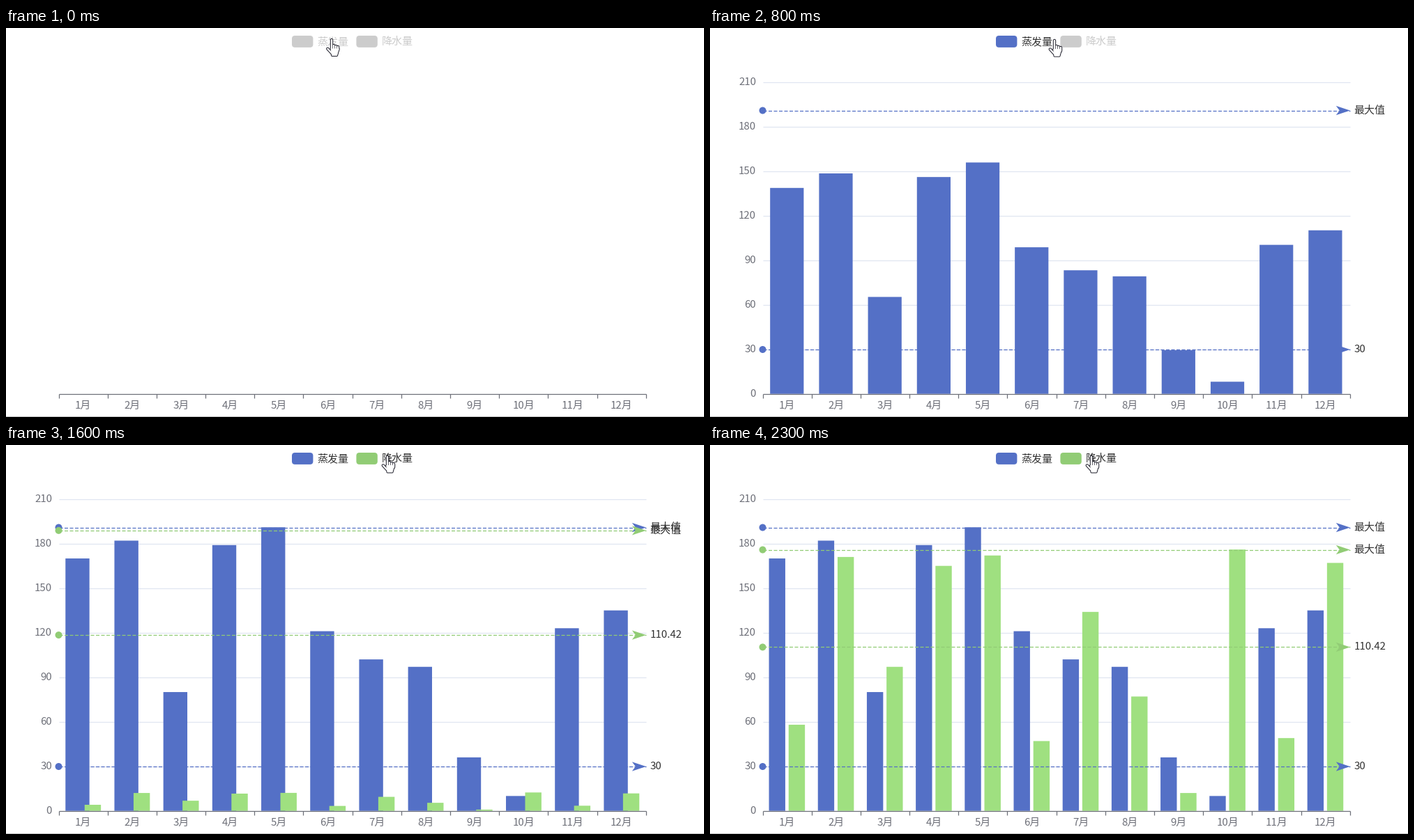
Animation of 1001x559 px, one loop 2.59 s. Source, as a matplotlib script:

```python
import numpy as np
import matplotlib.pyplot as plt
from matplotlib.animation import FuncAnimation
from matplotlib.collections import LineCollection
from matplotlib.patches import Circle, FancyBboxPatch, Polygon, Rectangle
from matplotlib.transforms import Affine2D

W, H, DPI = 1001, 559, 100
PX = 72 / DPI                      # points per pixel
LEFT, RIGHT, BASE, UNIT = 75.5, 917.8, 525.7, 64 / 30
BAND = (RIGHT - LEFT) / 12
WIDE, NARROW, GAP = 48.2, 23.4, 4.7

BLUE, BLUE_LIT = "#5470c6", "#5c7bd9"
GREEN, GREEN_LIT = "#91cc75", "#9fe080"
AXIS, GRID, OFF, INK = "#6e7079", "#e0e6f1", "#cccccc", "#333333"

EVAPORATION = [170, 182, 80, 179, 191, 121, 102, 97, 36, 10, 123, 135]
RAIN = [58, 171, 97, 165, 172, 47, 134, 77, 12, 176, 49, 167]

INTERVAL, FRAMES = 35, 74
STEP, LAST = 100, 23
FIRST_CLICK, SECOND_CLICK = 1, 13

plt.rcParams["font.family"] = ["Noto Sans CJK JP", "DejaVu Sans"]
fig = plt.figure(figsize=(W / DPI, H / DPI), dpi=DPI, facecolor="white")
ax = fig.add_axes([0, 0, 1, 1])
ax.set_xlim(0, W)
ax.set_ylim(H, 0)
ax.axis("off")


def y_of(value):
    return BASE - value * UNIT


def ease(p):
    """Cubic ease in and out."""
    p = min(max(p, 0), 1)
    return 4 * p ** 3 if p < 0.5 else 1 - 4 * (1 - p) ** 3


def mix(a, b, p):
    return a + (b - a) * p


def label(x, y, text, color, ha="left", z=6):
    return ax.text(x, y, text, color=color, ha=ha, va="baseline",
                   fontsize=15 * PX, zorder=z)


def segments(lines, color, z):
    item = LineCollection(lines, colors=color, linewidths=1.25 * PX, zorder=z)
    return ax.add_collection(item)


class Bars:
    def __init__(self, values, z):
        self.values = values
        self.patches = [ax.add_patch(Rectangle((0, 0), 0, 0, lw=0, zorder=z, snap=False))
                        for _ in values]

    def place(self, offset, width, grow, color):
        for i, (patch, value) in enumerate(zip(self.patches, self.values)):
            top = y_of(value * grow)
            patch.set_bounds(LEFT + BAND * (i + 0.5) + offset, top, width, BASE - top)
            patch.set_facecolor(color)


class MarkLine:
    """Dashed level with a dot, an arrow head and a label."""

    def __init__(self, value, text, color, z):
        self.value = value
        style = dict(fc=color, lw=0, zorder=z)
        self.line, = ax.plot([LEFT, RIGHT], [0, 0], color=color, lw=1.25 * PX,
                             ls=(0, (4, 2)), dash_capstyle="butt", zorder=z)
        self.dot = ax.add_patch(Circle((LEFT, 0), 5, **style))
        self.head = ax.add_patch(Polygon(np.eye(3, 2), **style))
        self.text = label(923.5, 0, text, INK, z=z)

    def place(self, shown, scale=1.0):
        y = y_of(self.value * scale) + 0.3
        self.line.set_ydata([y, y])
        self.dot.center = (LEFT, y)
        self.head.set_xy([(RIGHT, y), (RIGHT - 20, y + 6.67),
                          (RIGHT - 15, y), (RIGHT - 20, y - 6.67)])
        self.text.set_y(y + 4)
        for part in (self.line, self.dot, self.head, self.text):
            part.set_visible(shown)


class LegendItem:
    def __init__(self, x, text, color):
        self.color = color
        self.box = ax.add_patch(FancyBboxPatch(
            (x + 4.4, 15.4), 21.6, 8.1, lw=0, zorder=7,
            boxstyle="round,pad=4.4,rounding_size=4.4"))
        self.text = label(x + 36, 24, text, OFF, z=7)

    def set_on(self, on):
        self.box.set_facecolor(self.color if on else OFF)
        self.text.set_color(INK if on else OFF)


class Hand:
    """Pointer built from round strokes: a dark pass under a white one."""

    def __init__(self):
        self.move = Affine2D()
        spot = self.move + ax.transData
        tops = [2.2] + [10 + k for k in range(3)]
        strokes = [[(3.15 * k, top), (3.15 * k, 17)] for k, top in enumerate(tops)]
        strokes.append([(-5.7, 14.8), (0, 21)])
        palm = [(-0.8, 15), (10.2, 15), (7.5, 24.5), (0.5, 24.5)]
        for color, grow, z in (("#1c1c28", 1, 9), ("white", -1, 10)):
            ax.add_collection(LineCollection(
                strokes, colors=color, linewidths=(3.4 + grow) * PX,
                capstyle="round", transform=spot, zorder=z), autolim=False)
            ax.add_patch(Polygon(palm, fc=color, ec=color, lw=(2 + grow) * PX,
                                 joinstyle="round", transform=spot, zorder=z))

    def place(self, x, y):
        self.move.clear().translate(x, y)


# Axes
levels = range(30, 211, 30)
grid = segments([[(LEFT, y_of(v) + 0.5), (RIGHT, y_of(v) + 0.5)] for v in levels], GRID, 1)
y_parts = [grid] + [label(66, y_of(v) + 4.4, str(v), AXIS, "right")
                    for v in range(0, 211, 30)]
foot = BASE + 0.5
ticks = [[(LEFT + BAND * i, foot), (LEFT + BAND * i, foot + 6)] for i in range(13)]
segments([[(LEFT, foot), (RIGHT, foot)]] + ticks, AXIS, 4)
for i in range(12):
    label(LEFT + BAND * (i + 0.5), 547, f"{i + 1}月", AXIS, "center")
ax.add_patch(Rectangle((0, 558), W, 1, fc="#c4c4c4", lw=0))

blue_bars, green_bars = Bars(EVAPORATION, 2), Bars(RAIN, 3)
blue_marks = [MarkLine(max(EVAPORATION), "最大值", BLUE, 5), MarkLine(30, "30", BLUE, 5)]
mean = np.mean(RAIN)
green_marks = [MarkLine(max(RAIN), "最大值", GREEN, 5.5),
               MarkLine(mean, f"{mean:.2f}", GREEN, 5.5)]
blue_key = LegendItem(410, "蒸发量", BLUE)
green_key = LegendItem(502.4, "降水量", GREEN)
hand = Hand()


def draw(frame):
    step = min(((frame + 1) * INTERVAL - 1) // STEP, LAST)
    blue_on, green_on = step >= FIRST_CLICK, step >= SECOND_CLICK

    # Blue bars rise, then narrow to make room for the green ones
    rise = ease(0.471 + 0.0853 * (step - 6)) if blue_on else 0
    grow = np.interp(step, [12, 16, 19, 23], [0, 0.26, 0.66, 1])
    shift = ease(2 * grow)
    blue_bars.place(mix(-24.4, -NARROW - GAP / 2 - 0.3, shift),
                    mix(WIDE, NARROW, shift), rise, BLUE_LIT if step <= 7 else BLUE)
    green_bars.place(GAP / 2 - 0.2, NARROW, ease(grow) if green_on else 0,
                     GREEN_LIT if step > SECOND_CLICK + 1 else GREEN)

    for part in y_parts:
        part.set_visible(blue_on)
    for mark in blue_marks:
        mark.place(blue_on)
    for mark in green_marks:
        mark.place(green_on, 1 + (1 - shift) / 6)
    blue_key.set_on(blue_on)
    green_key.set_on(green_on)

    # The pointer sinks a little, then crosses to the second legend item
    sink = min(step / 6, 1) * 1.3
    cross = min(max((step - 7) / 3, 0), 1)
    hand.place(mix(467, 546.5, cross), mix(15 + sink, 14.5, cross))
    return []


anim = FuncAnimation(fig, draw, frames=FRAMES, interval=INTERVAL,
                     init_func=lambda: draw(0), repeat=True, repeat_delay=0)
plt.show()
```
